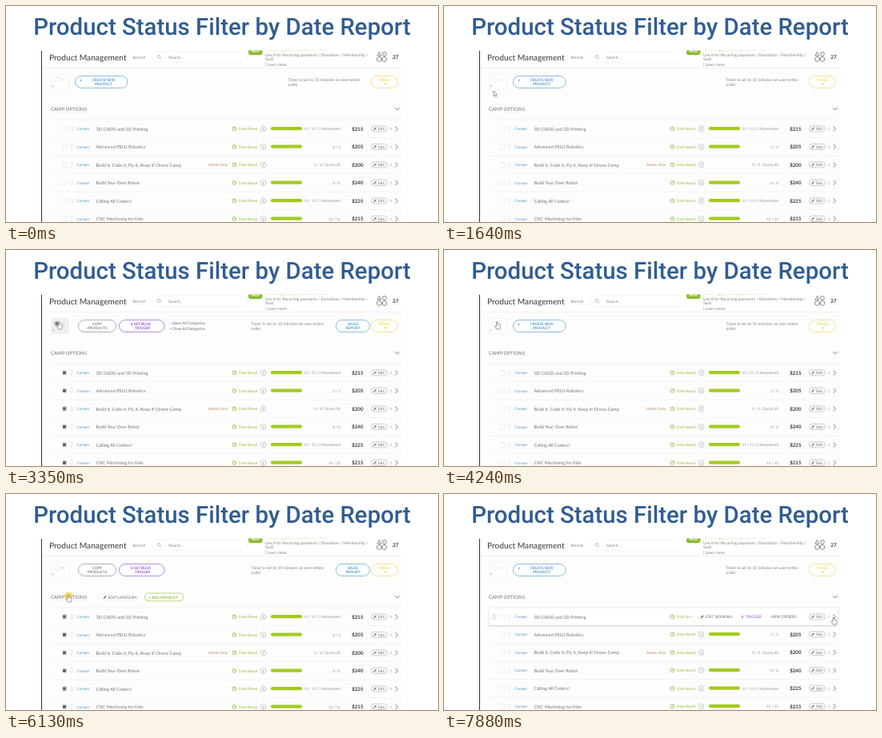
These frames come from a looping animation (540x270 px, 8 s). An HTML page with a canvas:

```html
<!DOCTYPE html>
<html lang="en">
<head>
<meta charset="utf-8">
<title>Product Status Filter by Date Report</title>
<style>
html, body { margin: 0; width: 100%; height: 100%; overflow: hidden; background: #fff; }
canvas { display: block; width: 540px; height: 270px; }
</style>
</head>
<body>
<canvas id="stage"></canvas>
<script>
const LOOP = 8000;
const canvas = document.getElementById('stage');
const ctx = canvas.getContext('2d');
const dpr = window.devicePixelRatio || 1;
canvas.width = 540 * dpr;
canvas.height = 270 * dpr;
ctx.textRendering = 'geometricPrecision';

const BLUE = '#4f9aca', GREEN = '#a4cb20', LEAF = '#8dbb32', PURPLE = '#9650d6';
const YELLOW = '#f5d35c', GREY = '#808080', DARK = '#383838', FAINT = '#e8e8e8';

const ROWS = [
  { name: '3D CADD and 3D Printing', count: '15 / 15 | 3 Abandoned', price: '$215', bar: true },
  { name: 'Advanced PELU Robotics', count: '2 / 2', price: '$205', bar: true },
  { name: 'Build it, Code it, Fly it, Keep it! Drone Camp', count: '0 / 0 | Quota 20', price: '$200', note: 'Admin Only' },
  { name: 'Build Your Own Robot', count: '8 / 8', price: '$240', bar: true },
  { name: 'Calling All Coders!', count: '11 / 11 | 3 Abandoned', price: '$225', bar: true },
  { name: 'CNC Machining for Kids', count: '12 / 12', price: '$215', bar: true }
];

// Pointer path: time, x, y of the tip
const PATH = [
  [1230, 96, 270], [1640, 62, 106], [1970, 64.5, 97], [2040, 64.5, 96], [2250, 66.5, 90],
  [4450, 66.5, 90], [4720, 78, 126], [6400, 78, 126], [6600, 240, 143],
  [6870, 415, 152], [6940, 446, 152.5], [7350, 484, 153], [7680, 484, 153], [7880, 487, 154]
];
const CLICKS = [[2450, 2640], [3910, 4110], [5060, 5300], [6130, 6330]];

const within = (t, a, b) => t >= a && t < b;

function pointerAt(t) {
  let i = PATH.findIndex(p => p[0] > t);
  if (i < 0) i = PATH.length;
  const [t0, x0, y0] = PATH[i - 1];
  const [t1, x1, y1] = PATH[Math.min(i, PATH.length - 1)];
  const k = t1 > t0 ? (t - t0) / (t1 - t0) : 0;
  return [x0 + (x1 - x0) * k, y0 + (y1 - y0) * k];
}

// y is the middle of the capitals
function text(str, x, y, size, color, { weight = 400, align = 'left', family = 'Lato' } = {}) {
  ctx.font = `${weight} ${size}px ${family}, sans-serif`;
  ctx.textAlign = align;
  ctx.fillStyle = color;
  ctx.fillText(str, x, y + size * 0.36);
}

function line(points, color, width = 0.7) {
  ctx.beginPath();
  points.forEach(([x, y]) => ctx.lineTo(x, y));
  ctx.strokeStyle = color;
  ctx.lineWidth = width;
  ctx.stroke();
}

function box(x, y, w, h, r, { fill, stroke, width = 0.7 } = {}) {
  ctx.beginPath();
  ctx.roundRect(x, y, w, h, r);
  if (fill) { ctx.fillStyle = fill; ctx.fill(); }
  if (stroke) { ctx.strokeStyle = stroke; ctx.lineWidth = width; ctx.stroke(); }
}

function ring(x, y, r, color, width = 0.7) {
  ctx.beginPath();
  ctx.arc(x, y, r, 0, Math.PI * 2);
  ctx.strokeStyle = color;
  ctx.lineWidth = width;
  ctx.stroke();
}

function button(x, w, color, lines, textX = x + w / 2) {
  box(x, 87.5, w, 15, 7.5, { fill: '#fff', stroke: color, width: 0.65 });
  lines.forEach((str, i) => text(str, textX, 92.4 + i * 5, 4.6, color, { weight: 700, align: 'center' }));
}

function triangle(x, y, w, h, color) {
  ctx.beginPath();
  ctx.moveTo(x - w / 2, y);
  ctx.lineTo(x + w / 2, y);
  ctx.lineTo(x, y + h);
  ctx.fillStyle = color;
  ctx.fill();
}

function pencil(x, y, color) {
  line([[x, y + 1.7], [x + 3.2, y - 1.5]], color, 1.1);
}

function bolt(x, y) {
  line([[x + 0.4, y - 1.8], [x - 0.8, y + 0.1], [x + 0.8, y - 0.1], [x - 0.4, y + 1.8]], PURPLE, 0.8);
}

function drawShapesIcon() {
  const color = '#666';
  line([[466.5, 57.5], [468.9, 62.2], [464.1, 62.2], [466.5, 57.5]], color, 0.8);
  ring(473, 60, 2.4, color, 0.8);
  for (const x of [466.5, 473]) {
    line([[x, 63.3], [x + 2.7, 65], [x + 2.7, 68], [x, 69.7], [x - 2.7, 68], [x - 2.7, 65], [x, 63.3]], color, 0.8);
  }
}

function drawHeader() {
  text('Product Management', 54, 64, 10.2, DARK);
  text('Refresh', 158.5, 64, 4.8, GREY);
  box(182.5, 57, 119, 13.5, 6.7, { stroke: '#f0f0f0' });
  ring(191, 63.3, 2, '#aaa');
  line([[192.5, 64.8], [194, 66.3]], '#aaa');
  text('Search...', 203, 64, 4.9, GREY);

  ctx.save();
  ctx.beginPath();
  ctx.rect(300, 55.5, 180, 40);
  ctx.clip();
  box(303, 50, 17.5, 11.2, 3, { fill: LEAF });
  text('New', 311.8, 56, 5, '#fff', { weight: 700, align: 'center' });
  text('Recurring payment plans are here', 324, 54.2, 5.4, LEAF);
  ctx.restore();
  text('Use it for Recurring payments / Donations / Membership /', 324, 60.7, 5, GREY);
  text('SaaS', 324, 66.3, 5, GREY);
  text('| Learn more', 324, 73, 5, GREY);

  drawShapesIcon();
  text('27', 487, 64, 6.4, DARK, { weight: 700, align: 'center' });
  line([[45, 77.5], [495, 77.5]], '#f1f1f1', 1);
}

function drawToolbar(selected, openLinks, pressed) {
  box(56.5, 85.5, 22, 19, 1, { fill: pressed ? '#f0f0f0' : '#fff', stroke: '#f0f0f0' });
  box(60.5, 89, 6, 6, 1, { stroke: pressed ? '#bbb' : '#e2e2e2' });
  if (pressed) box(61.5, 90, 4, 4, 0, { fill: '#777' });
  text('24', 67.5, 92, 5, selected ? '#c4c4c4' : '#e2e2e2');
  triangle(58.8, 99.5, 3, 2, '#b5b5b5');

  if (selected) {
    button(90.5, 47, '#858585', ['COPY', 'PRODUCTS']);
    button(141.5, 56.5, PURPLE, ['SET BULK', 'TRIGGER'], 170.5);
    bolt(157.2, 92.8);
    button(412.5, 42, BLUE, ['SALES', 'REPORT']);
  } else {
    button(86.5, 65.5, BLUE, ['CREATE NEW', 'PRODUCT'], 122);
    text('+', 93.5, 93, 6, BLUE, { weight: 700, align: 'center' });
  }
  if (openLinks) {
    text('– Open All Categories', 204, 91.5, 4.7, '#666');
    text('> Close All Categories', 204, 98.3, 4.7, '#666');
  }
  const noteX = selected ? 306.5 : 352.5;
  text('Timer is set to 15 minutes on user entire', noteX, 92.3, 5.1, GREY);
  text('order', noteX, 98.3, 5.1, GREY);
  button(456.5, 33, YELLOW, ['TOOLS'], 472.5);
  triangle(474, 96.6, 3.6, 2.5, YELLOW);
}

function drawCategory(hover) {
  text('CAMP OPTIONS', 56, 129, 6, '#707070');
  line([[486.2, 127.2], [489, 130], [491.8, 127.2]], '#666', 0.8);
  if (!hover) return;
  pencil(122, 129, '#555');
  text('EDIT CATEGORY', 127.5, 129, 4.75, '#666');
  box(173.5, 124, 48.5, 9.8, 4.9, { fill: '#fff', stroke: LEAF, width: 0.6 });
  text('+ ADD PRODUCT', 178, 129, 4.6, LEAF, { weight: 700 });
}

function drawActions(y) {
  const fade = ctx.createLinearGradient(303, 0, 315, 0);
  fade.addColorStop(0, 'rgba(255,255,255,0)');
  fade.addColorStop(1, '#fff');
  ctx.fillStyle = fade;
  ctx.fillRect(303, y - 7, 150, 14);
  pencil(321, y, '#555');
  text('EDIT SESSIONS', 327, y, 4.7, '#666');
  bolt(373, y);
  text('TRIGGER', 377, y, 4.8, PURPLE);
  text('VIEW ORDERS', 408.5, y, 4.75, '#666');
}

function drawRow(row, y, selected, hover) {
  if (hover) {
    ctx.save();
    ctx.shadowColor = 'rgba(0,0,0,.2)';
    ctx.shadowBlur = 2.5;
    ctx.shadowOffsetY = 1;
    box(56.5, y - 11, 436, 21.5, 1, { fill: '#fff' });
    ctx.restore();
    ctx.fillStyle = '#aaa';
    for (let i = 0; i < 8; i++) ctx.fillRect(61 + (i % 2) * 2, y - 4 + (i >> 1) * 2.3, 1, 1);
  } else {
    line([[56, y + 11.2], [494, y + 11.2]], '#f3f3f3', 1);
  }
  box(70, y - 3, 6, 6, 1, { stroke: FAINT });
  if (selected) box(71, y - 2.2, 4.2, 4.2, 0.5, { fill: '#6a6a6a' });
  line([[82, y - 3.5], [84, y - 0.5], [82, y + 3.5], [80, y - 0.5], [82, y - 3.5]], '#e2e2e2');

  text('Camper', 88.5, y + 0.3, 4.65, BLUE);
  text(row.name, 112.5, y, 5.6, '#737373');
  if (row.note) text(row.note, 253, y, 4.65, '#b58262');
  ring(285.5, y, 2.4, LEAF, 0.8);
  line([[285.5, y - 1.4], [285.5, y], [286.6, y]], LEAF);
  text('Date Based', 291, y, 4.6, LEAF);

  if (hover) {
    drawActions(y);
  } else {
    ring(321.5, y, 3.4, '#b5b5b5');
    text('1', 321.5, y, 4.3, GREY, { align: 'center' });
    if (row.bar) box(331, y - 2.5, 39, 4.2, 2, { fill: GREEN });
    text(row.count, 418, y, 4.6, '#909090', { align: 'right' });
    text(row.price, 446.5, y, 6.2, DARK, { weight: 700, align: 'right' });
  }
  box(456.5, y - 3.7, 20, 7.2, 3.6, { stroke: '#b5b5b5' });
  pencil(459.5, y, '#666');
  text('Edit', 465.3, y, 4.6, '#666');
  text('1', 481, y, 4.4, '#909090', { align: 'center' });
  line([[486.7, y - 3], [489.7, y], [486.7, y + 3]], '#606060', 0.8);
}

function drawPointer(t) {
  if (t < PATH[0][0]) return;
  const [x, y] = pointerAt(t);
  if (CLICKS.some(([a, b]) => within(t, a, b))) {
    ctx.beginPath();
    ctx.ellipse(x + 0.3, y + 1.3, 5.2, 4.8, 0, 0, Math.PI * 2);
    ctx.fillStyle = 'rgba(248,216,70,.8)';
    ctx.fill();
  }
  const hand = within(t, 2250, 4480) || within(t, 4650, 6430) || t >= 7350;
  const shape = hand
    ? [[-0.9, 0], [0.6, 0], [0.8, 3], [3.8, 3.8], [4.2, 5.5], [3.2, 9], [-0.8, 9], [-3, 5.5], [-2.4, 4.6], [-0.9, 5.6]]
    : [[0, 0], [0, 6.6], [1.5, 5.3], [2.6, 7.6], [3.6, 7.1], [2.6, 4.9], [4.5, 4.8]];
  ctx.beginPath();
  shape.forEach(([dx, dy]) => ctx.lineTo(x + dx, y + dy));
  ctx.closePath();
  ctx.fillStyle = '#fff';
  ctx.strokeStyle = '#777';
  ctx.lineWidth = 0.75;
  ctx.lineJoin = 'round';
  ctx.fill();
  ctx.stroke();
}

function draw(t) {
  const allSelected = within(t, 2640, 4150);
  const selected = allSelected || within(t, 5300, 6330);
  const rowHover = t >= 6600;

  ctx.setTransform(dpr, 0, 0, dpr, 0, 0);
  ctx.fillStyle = '#fff';
  ctx.fillRect(0, 0, 540, 270);
  text('Product Status Filter by Date Report', 270, 25, 29.4, '#315d91',
    { weight: 500, align: 'center', family: 'Roboto' });

  ctx.fillStyle = '#fdfdfd';
  ctx.fillRect(45, 78, 450, 192);
  ctx.fillStyle = '#333';
  ctx.fillRect(44, 56, 1, 214);

  drawHeader();
  drawToolbar(selected, allSelected, allSelected);
  drawCategory(within(t, 4650, 6470));
  line([[56, 142], [494, 142]], '#f3f3f3', 1);
  for (let i = ROWS.length - 1; i >= 0; i--) {
    const lift = rowHover && i > 0 ? 0.5 : 0;
    drawRow(ROWS[i], 153.5 + i * 22.5 - lift, selected, rowHover && i === 0);
  }
  drawPointer(t);
}

function frame() {
  draw(performance.now() % LOOP);
  requestAnimationFrame(frame);
}
frame();
</script>
</body>
</html>
```
